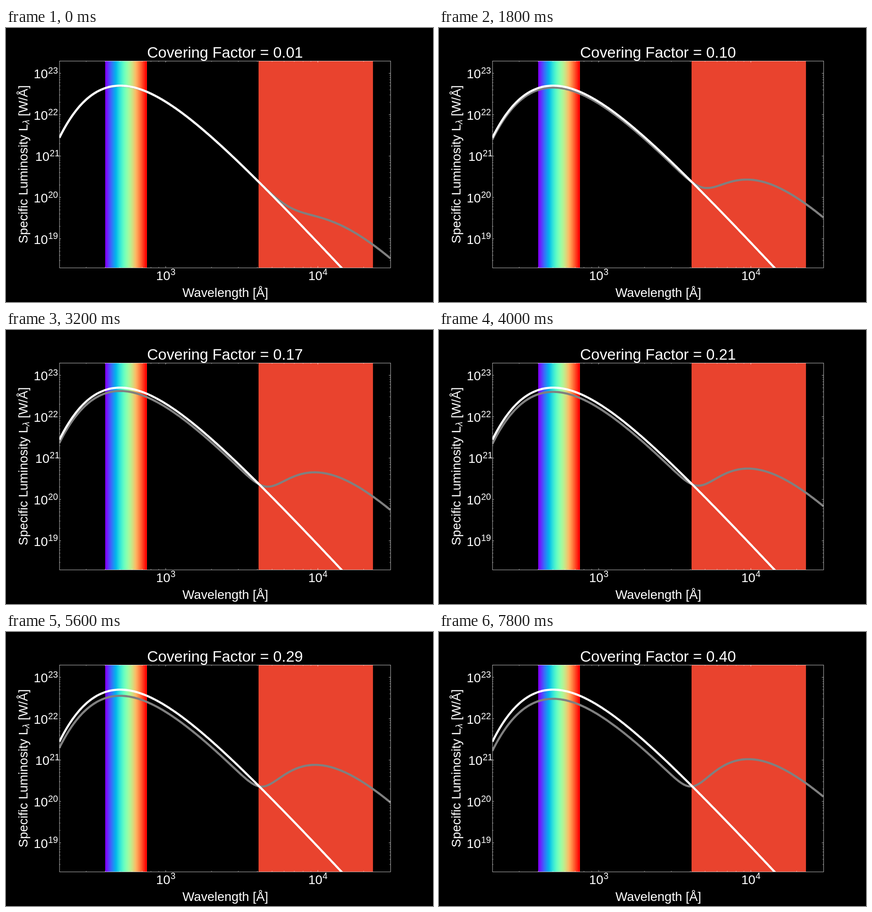
An HTML page that plays this animation: 933x600 px, repeating every 8000 ms.

```html
<!DOCTYPE html>
<html lang="en">
<head>
<meta charset="utf-8">
<title>Covering Factor</title>
<style>
  html, body { margin: 0; width: 100%; height: 100%; overflow: hidden; background: #000; }
  svg { display: block; width: 100%; height: 100%; }
  text { fill: #fff; font: 27.8px "Liberation Sans", Arial, sans-serif; white-space: pre; }
  .title { font-size: 33.4px; }
  .script { font-size: 19.46px; }
  .curve { fill: none; stroke-width: 4.63; stroke-linejoin: round; }
  .axes { fill: none; stroke: #fff; }
</style>
</head>
<body>
<svg viewBox="0 0 933 600">
  <clipPath id="plot"><rect x="116.67" y="72" width="723.33" height="453"/></clipPath>
  <g clip-path="url(#plot)">
    <g id="bands"></g>
    <path id="covered" class="curve" stroke="#808080"/>
    <path id="star" class="curve" stroke="#fff"/>
  </g>
  <path id="minor" class="axes" stroke-width=".55"/>
  <path id="major" class="axes" stroke-width=".74"/>
  <rect class="axes" x="117" y="72.3" width="723.3" height="452.9" stroke-width=".74"/>
  <g id="labels"></g>
  <text id="title" class="title" x="478.5" y="65" text-anchor="middle"></text>
  <text x="479.3" y="589" text-anchor="middle">Wavelength [Å]</text>
  <text transform="translate(46.7 298.5) rotate(-90)" text-anchor="middle">Specific Luminosity L<tspan class="script" font-style="italic" dy="4.5">λ</tspan><tspan dy="-4.5"> [W/Å]</tspan></text>
</svg>
<script>
const $ = id => document.getElementById(id);
const LEFT = 116.67, RIGHT = 840, TOP = 72, BOTTOM = 525;
const MIN_WAVE = 200, MAX_WAVE = 30000, MIN_LUM = 2e18, MAX_LUM = 2e23;
const STAR_TEMP = 5778, SHELL_TEMP = 300, STAR_RADIUS = 6.957e8;
const VIOLET = 400, RED = 750, STRIPES = 35;
const STEP_MS = 200, STEPS = 40;

const xOf = wave => LEFT + (RIGHT - LEFT) * Math.log(wave / MIN_WAVE) / Math.log(MAX_WAVE / MIN_WAVE);
const yOf = lum => BOTTOM - (BOTTOM - TOP) * Math.log(lum / MIN_LUM) / Math.log(MAX_LUM / MIN_LUM);

// Blackbody luminosity of a sphere with the star's radius, wavelength in nm
function planck(wave, temp) {
  const flux = 3.7418e-16 / (wave * 1e-9) ** 5 / Math.expm1(1.43878e7 / (wave * temp));
  return 4 * Math.PI * STAR_RADIUS ** 2 * flux * 1e-10;
}
const starLum = wave => planck(wave, STAR_TEMP);
// The shell re-emits all the starlight that it absorbs
const shellLum = wave => (STAR_TEMP / SHELL_TEMP) ** 4 * planck(wave, SHELL_TEMP);

function curve(lum) {
  const points = [];
  for (let i = 0; i <= 300; i++) {
    const wave = MIN_WAVE * (MAX_WAVE / MIN_WAVE) ** (i / 300);
    points.push(xOf(wave).toFixed(2) + ' ' + yOf(lum(wave)).toFixed(2));
  }
  return 'M' + points.join('L');
}

function band(from, to, color) {
  const x = xOf(from);
  return `<rect x="${x}" y="${TOP}" width="${xOf(to) - x}" height="${BOTTOM - TOP}" fill="${color}"/>`;
}

function rainbow(f) {
  const channels = [Math.abs(2 * f - .5), Math.sin(Math.PI * f), Math.cos(Math.PI * f / 2)];
  return `rgb(${channels.map(c => Math.round(255 * Math.min(1, c)))})`;
}

// Each stripe reaches to the red end, so that no seams show between them
function drawBands() {
  let html = band(4075, 23030, '#e9432e');
  for (let i = 0; i < STRIPES; i++) {
    const wave = VIOLET * (RED / VIOLET) ** (i / STRIPES);
    html += band(wave, RED, rainbow(i / (STRIPES - 1)));
  }
  $('bands').innerHTML = html;
}

function drawTicks() {
  const paths = { major: '', minor: '' };
  const eachTick = (min, max, draw) => {
    for (let power = Math.floor(Math.log10(min)); 10 ** power < max; power++)
      for (let digit = 1; digit < 10; digit++) {
        const value = digit * 10 ** power;
        if (value > min && value < max) draw(value, digit === 1 ? 'major' : 'minor', digit === 1 ? 3.5 : 2.1);
      }
  };
  eachTick(MIN_WAVE, MAX_WAVE, (wave, kind, size) => {
    paths[kind] += `M${xOf(wave)} ${TOP}v${size}M${xOf(wave)} ${BOTTOM}v${-size}`;
  });
  eachTick(MIN_LUM, MAX_LUM, (lum, kind, size) => {
    paths[kind] += `M${LEFT} ${yOf(lum)}h${size}M${RIGHT} ${yOf(lum)}h${-size}`;
  });
  for (const kind in paths) $(kind).setAttribute('d', paths[kind]);
}

const powerLabel = (x, y, power) =>
  `<text x="${x}" y="${y}">10<tspan class="script" dx=".5" dy="-10.3">${power}</tspan></text>`;

function drawLabels() {
  let html = '';
  for (const power of [3, 4]) html += powerLabel(xOf(10 ** power) - 21, 551.5, power);
  for (let power = 19; power <= 23; power++)
    html += powerLabel(power === 21 ? 64 : 60.5, yOf(10 ** power) + 11, power);
  $('labels').innerHTML = html;
}

function frame(now) {
  const step = Math.floor(now / STEP_MS) % STEPS;
  const factor = (step + 1) / 100;
  $('title').textContent = 'Covering Factor = ' + factor.toFixed(2);
  $('covered').setAttribute('d', curve(wave => (1 - factor) * starLum(wave) + factor * shellLum(wave)));
  requestAnimationFrame(frame);
}

drawBands();
drawTicks();
drawLabels();
$('star').setAttribute('d', curve(starLum));
frame(0);
</script>
</body>
</html>
```
